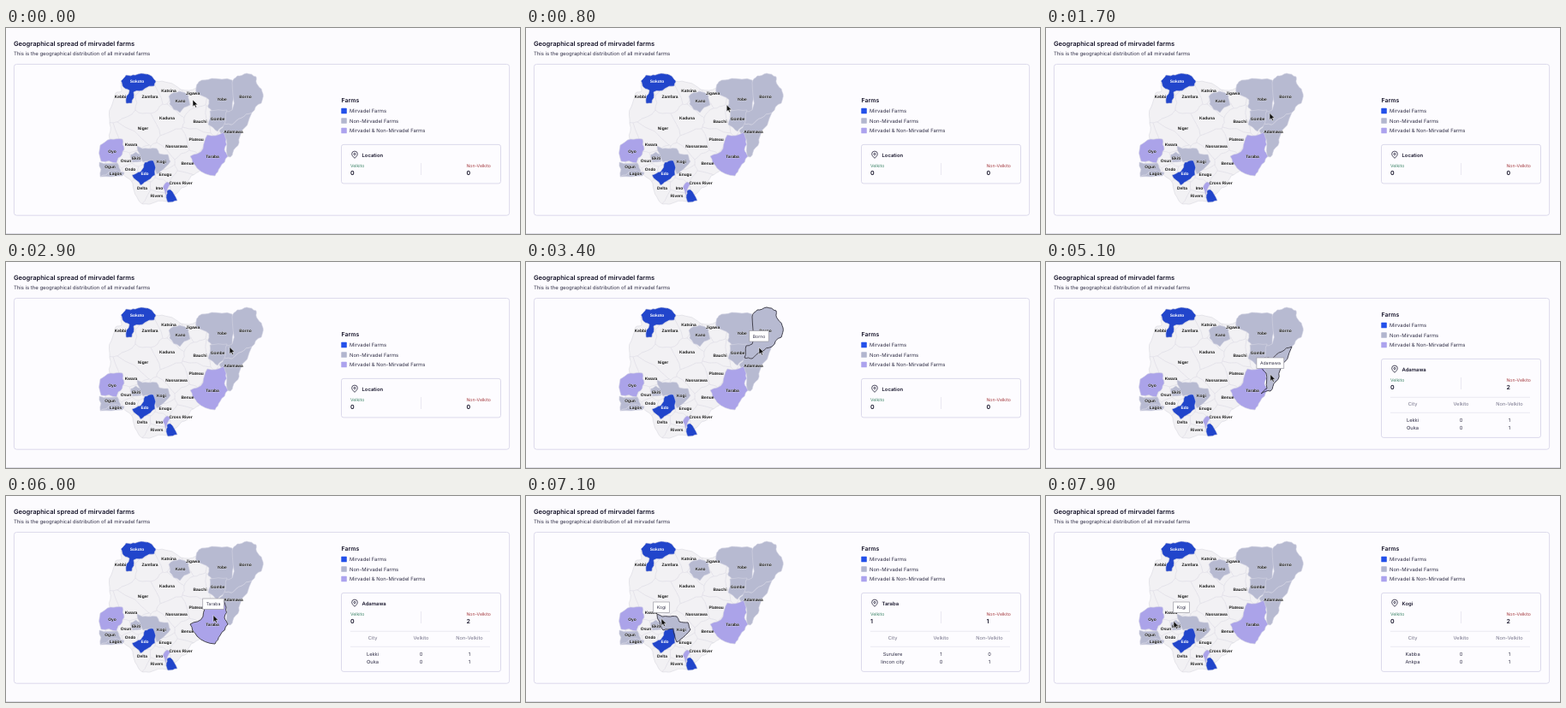
Recreate the animation shown at these times as an HTML page. Size 600 px wide and 241 px high, loop 8000 ms.

```html
<!DOCTYPE html>
<html lang="en">
<head>
<meta charset="utf-8">
<title>Farm map</title>
<style>
html, body { margin: 0; width: 100%; height: 100%; overflow: hidden; background: #fcfbfe; }
svg { display: block; width: 600px; height: 241px; font-family: Inter, sans-serif; text-rendering: geometricPrecision; }
text { fill: #2f2d45; }
.bold { font-weight: 600; fill: #17152b; }
.map text { font: bold 4.85px "Liberation Sans", Arial, sans-serif; text-anchor: middle; fill: #111; stroke: #fff; stroke-width: .7px; stroke-opacity: .6; paint-order: stroke; }
.map text.light { fill: #fff; stroke: none; }
.mid { text-anchor: middle; }
.dim { fill: #77758b; }
.line { fill: none; stroke: #dddbe8; stroke-width: .6; }
.box { fill: #fdfcff; stroke: #d3d1e6; stroke-width: .8; }
</style>
</head>
<body>
<svg id="stage" viewBox="0 0 600 241"></svg>
<script>
const LOOP = 8000;
const BRAND = 'Mirvadel', PARTNER = 'Velkito';
const BLUE = '#2145cb', GREY = '#b7bad1', LILAC = '#aba3e9';
const stage = document.getElementById('stage');

function add(parent, tag, attrs = {}, content = '') {
  const el = document.createElementNS('http://www.w3.org/2000/svg', tag);
  for (const key in attrs) el.setAttribute(key, attrs[key]);
  el.textContent = content;
  parent.append(el);
  return el;
}
const text = (parent, x, y, size, str, cls = '', fill = '') =>
  add(parent, 'text', { x, y, 'font-size': size, class: cls, ...(fill && { style: 'fill:' + fill }) }, str);
const line = (parent, d) => add(parent, 'path', { d, class: 'line' });

// Page and card
text(stage, 9, 20.6, 7.5, `Geographical spread of ${BRAND.toLowerCase()} farms`, 'bold');
text(stage, 9, 31.7, 5.95, `This is the geographical distribution of all ${BRAND.toLowerCase()} farms`);
add(stage, 'rect', { x: 9.4, y: 42.4, width: 578.2, height: 176.8, rx: 3, class: 'box' });
add(stage, 'rect', { y: 240, width: 600, height: 1, fill: '#dedde6' });

// Splits every edge twice at a seeded offset; neighbours sharing an edge get the same bends
function rough(points, depth = 2) {
  if (!depth) return points;
  const bent = points.flatMap((a, i) => {
    const b = points[(i + 1) % points.length];
    const seed = Math.sin((a[0] + b[0]) * 12.9 + (a[1] + b[1]) * 78.2) * 43758;
    const side = a[0] < b[0] || (a[0] === b[0] && a[1] < b[1]) ? 1 : -1;
    const k = (seed - Math.floor(seed) - .5) * .25 * side;
    return [a, [(a[0] + b[0]) / 2 - (b[1] - a[1]) * k, (a[1] + b[1]) / 2 + (b[0] - a[0]) * k]];
  });
  return rough(bent, depth - 1);
}
const parse = str => str.match(/\d+ \d+/g).map(pair => pair.split(' ').map(Number));
const outlineOf = str => rough(parse(str)).join(' ');

// Part of a convex polygon that lies nearer to p than to q
function nearer(poly, p, q) {
  const gap = ([x, y]) => Math.hypot(x - q[0], y - q[1]) ** 2 - Math.hypot(x - p[0], y - p[1]) ** 2;
  return poly.flatMap((a, i) => {
    const b = poly[(i + 1) % poly.length], ga = gap(a), gb = gap(b), k = ga / (ga - gb);
    const cut = ga * gb < 0 ? [[a[0] + (b[0] - a[0]) * k, a[1] + (b[1] - a[1]) * k]] : [];
    return ga >= 0 ? [a, ...cut] : cut;
  });
}

const LABELS = 'Sokoto 153 62,Kebbi 133.5 80,Zamfara 168 80,Katsina 190 73,Jigawa 218 76,Kano 203.5 85.5,Kaduna 188 105,Bauchi 226.5 109.5,Yobe 252 83.5,Borno 279.5 80.5,Gombe 247 106,Adamawa 265.5 121,Niger 160 117,Kwara 146 136.5,Plateau 222 130,Nassarawa 199 138,Taraba 241 150,Benue 212 158,Kogi 181.5 156.5,Ekiti 152 152,Oyo 124 144,Osun 140 155,Ondo 145 165.5,Ogun 121.5 162,Lagos 128 170,Edo 162 170,Enugu 186 171,Cross River 204 181,Delta 159 187,Imo 179 187,Rivers 176 196.5'
  .split(',').map(item => {
    const [, name, x, y] = item.match(/(.+) (\S+) (\S+)$/);
    return { name, at: [+x, +y] };
  });
const COUNTRY = '134 64 150 60 174 62 190 64 204 72 222 70 240 66 262 110 245 160 228 165 216 173 212 184 200 193 188 203 168 206 160 206 153 198 148 182 137 171 118 165 118 140 121 130 121 112 123 92 128 76 135 74';
const STATES = {
  Sokoto: [BLUE, '134 62 140 55 151 55 158 53 168 55 175 62 173 68 162 71 149 75 147 88 140 88 144 73 136 68'],
  Kano: [GREY, '190 80 203 74 213 79 215 90 203 99 191 89'],
  Yobe: [GREY, '222 70 225 63 240 59 264 61 264 97 240 97 236 93 237 84 223 77'],
  Gombe: [GREY, '238 97 258 96 256 114 247 121 236 113'],
  Ekiti: [GREY, '146 148 152 145 157 148 158 156 148 157'],
  Oyo: [LILAC, '110 137 122 130 136 130 138 142 131 152 129 158 111 156'],
  Ogun: [GREY, '109 157 130 158 134 169 122 167 110 174'],
  Lagos: [GREY, '110 174 122 167 138 169 136 173'],
  Abia: [LILAC, '183 187 188 180 192 183 188 190 186 199'],
  Coast: [BLUE, '188 190 192 189 200 202 189 204 187 197'],
  Adamawa: [GREY, '287 99 273 127 268 140 262 151 251 154 258 148 257 130 249 120 255 112 264 113 275 105'],
  Borno: [GREY, '264 64 270 56 281 53 292 57 294 67 300 77 298 88 287 99 275 105 264 113 255 112 257 98 264 96'],
  Taraba: [LILAC, '235 125 254 122 257 130 255 142 259 150 250 163 244 173 223 164 215 150 230 141'],
  Kogi: [GREY, '153 138 166 141 176 141 179 147 189 148 192 156 180 168 176 171 172 155 160 157 156 147'],
  Edo: [BLUE, '162 157 172 155 174 172 163 180 157 184 147 172 157 168'],
};

// Plain states are the cells around the labels, trimmed to the country
const map = add(stage, 'g', { class: 'map', 'stroke-linejoin': 'round', 'stroke-width': .6 });
const land = outlineOf(COUNTRY);
add(add(map, 'clipPath', { id: 'land' }), 'polygon', { points: land });
const cells = add(map, 'g', { 'clip-path': 'url(#land)', fill: '#f2f1f4', stroke: '#dfdee6' });
for (const { at } of LABELS) {
  let cell = [[100, 40], [310, 40], [310, 215], [100, 215]];
  for (const other of LABELS) if (other.at !== at) cell = nearer(cell, at, other.at);
  add(cells, 'polygon', { points: rough(cell.map(p => p.map(Math.round))).join(' ') });
}
add(map, 'polygon', { points: land, fill: 'none', stroke: '#d9d8e0' });
for (const [fill, points] of Object.values(STATES))
  add(map, 'polygon', { points: outlineOf(points), fill, stroke: '#d4d3e3' });
const outline = add(map, 'polygon', { fill: 'none', stroke: '#34333f', 'stroke-width': .9 });
for (const { name, at: [x, y] } of LABELS)
  add(map, 'text', { x, y: y + 1.7, class: STATES[name]?.[0] === BLUE ? 'light' : '' }, name);

// Legend and details, laid out for the collapsed panel
const side = add(stage, 'g');
text(side, 391.5, 86.7, 6.9, 'Farms', 'bold');
[['#2350ea', `${BRAND} Farms`], ['#b2b6cf', `Non-${BRAND} Farms`], ['#aca3ee', `${BRAND} & Non-${BRAND} Farms`]]
  .forEach(([fill, label], i) => {
    const y = 97 + i * 11.5;
    add(side, 'rect', { x: 391.3, y: y - 3.2, width: 6.5, height: 6.5, rx: .6, fill });
    text(side, 401, y + 2.1, 5.9, label);
  });
const panel = add(side, 'rect', { x: 391.5, y: 136.4, width: 186, rx: 2.5, class: 'box' });
const pin = add(side, 'g', { fill: 'none', stroke: '#25233a', 'stroke-width': .8 });
add(pin, 'path', { d: 'M407 152.4Q403.6 149.400 403.600 147.500A3.400 3.400 0 0 1 410.400 147.500Q410.400 149.400 407 152.400Z' });
add(pin, 'circle', { cx: 407, cy: 147.5, r: 1.1 });
const place = text(side, 415.5, 150.5, 5.9, '', 'bold');
text(side, 402, 162.9, 5.15, PARTNER, '', '#3d8567');
text(side, 537.5, 162.9, 5.15, 'Non-' + PARTNER, '', '#a53a3e');
const totals = [402, 537.5].map(x => text(side, x, 172.4, 7, '', 'bold'));
line(side, 'M484.500 158V172');

const table = add(side, 'g');
line(table, 'M402 181.300H565M402 199.300H565');
const columns = [0, 1, 2].map(i => 428 + i * 56.5);
['City', PARTNER, 'Non-' + PARTNER].forEach((label, i) => text(table, columns[i], 191, 5.7, label, 'mid dim'));
const rows = [0, 1].map(row => columns.map(x => text(table, x, 210.3 + row * 8.7, 5.7, '', 'mid')));

// City, partner farms, other farms
const FARMS = {
  Adamawa: [['Lekki', 0, 1], ['Ouka', 0, 1]],
  Taraba: [['Surulere', 1, 0], ['lincon city', 0, 1]],
  Kogi: [['Kabba', 0, 1], ['Ankpa', 0, 1]],
};

// Tooltip and pointer
const tip = add(stage, 'g');
const tipBox = add(tip, 'rect', { y: -19.5, height: 12.5, fill: '#fff', stroke: '#9b9aa3', 'stroke-width': .7 });
const tipText = text(tip, 0, -11.4, 5.1, '', 'mid');
const pointer = add(stage, 'path', { d: 'M0 0V8L1.900 6.300 3.200 9.100 4.500 8.500 3.300 5.800H5.800Z', fill: '#111', stroke: '#fff', 'stroke-width': .5 });

// Pointer moves; a state reacts halfway through the move towards it
const HOME = [218, 84];
const MOVES = [
  { start: 300, end: 1500, to: [261, 99.5] },
  { start: 2900, end: 3300, to: [272, 100], state: 'Borno' },
  { start: 3600, end: 4200, to: [263, 131], state: 'Adamawa', click: 4300 },
  { start: 5000, end: 5700, to: [242, 139.5], state: 'Taraba', click: 6500 },
  { start: 6500, end: 7050, to: [158, 143.5], state: 'Kogi', click: 7500 },
  { start: 7650, end: 7850, to: [149, 146.5] },
];

const ease = k => k * k * (3 - 2 * k);
const clamp = k => Math.min(1, Math.max(0, k));
const pointAt = t => MOVES.reduce((p, { start, end, to }) => {
  const k = ease(clamp((t - start) / (end - start)));
  return p.map((v, i) => v + (to[i] - v) * k);
}, HOME);

function showDetails(name) {
  const farms = FARMS[name] || [];
  side.setAttribute('transform', `translate(0 ${name ? -23 : 0})`);
  panel.setAttribute('height', name ? 92 : 45.5);
  table.setAttribute('visibility', name ? 'visible' : 'hidden');
  place.textContent = name || 'Location';
  totals.forEach((el, i) => el.textContent = farms.reduce((sum, row) => sum + row[i + 1], 0));
  farms.forEach((row, r) => row.forEach((value, c) => rows[r][c].textContent = value));
}

function showTip(name, [x, y]) {
  tip.setAttribute('visibility', name ? 'visible' : 'hidden');
  if (!name) return;
  tipText.textContent = name;
  const width = tipText.getComputedTextLength() + 8;
  tipBox.setAttribute('x', -width / 2);
  tipBox.setAttribute('width', width);
  tip.setAttribute('transform', `translate(${x} ${y})`);
}

function frame() {
  const t = performance.now() % LOOP;
  const at = pointAt(t);
  const move = MOVES.findLast(m => (m.start + m.end) / 2 <= t);
  const clicked = MOVES.findLast(m => m.click <= t);
  const last = MOVES.findLast(m => m.state && (m.start + m.end) / 2 <= t);
  outline.setAttribute('points', move?.state ? outlineOf(STATES[move.state][1]) : '');
  showDetails(clicked?.state);
  showTip(last?.state, move === last ? at : last?.to || at);
  pointer.setAttribute('transform', `translate(${at})`);
  requestAnimationFrame(frame);
}
frame();
</script>
</body>
</html>
```
